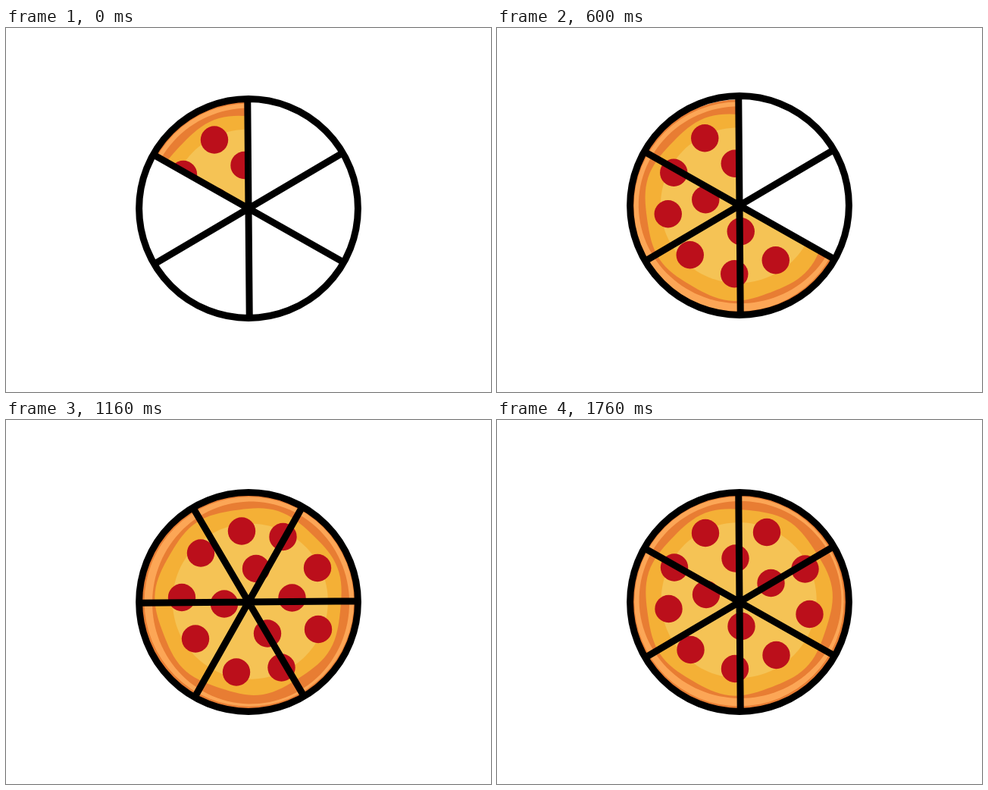
Write an HTML page with a canvas that moves like this. It is 640x480 px and loops after 1800 ms.

```html
<!DOCTYPE html>
<html lang="en">
<head>
<meta charset="utf-8">
<title>Pizza slices</title>
<style>
  html, body { margin: 0; width: 100%; height: 100%; overflow: hidden; background: #fff; }
  canvas { display: block; }
</style>
</head>
<body>
<canvas id="stage" width="640" height="480"></canvas>
<script>
const WIDTH = 640, HEIGHT = 480;
const LOOP = 1800, STEP = 200, BLEND = 40;
const TAU = Math.PI * 2, DEG = Math.PI / 180;
const wave = (deg, peak = 0, lobes = 1) => Math.cos(lobes * (deg - peak) * DEG);

// Outlines of the layers: radius by angle, clockwise from the top.
const crust = a => 131.7 + 3.2 * wave(a, 18) - 1.7 * wave(a, 0, 2);
const sauce = a => 122.8 + 1.5 * wave(a, 300) + 1.8 * wave(a, 288, 7);
const cheese = a => 102.5 + 2.5 * wave(a, 340);

const pepperoni = [
  [-45, -91], [36, -92], [86.5, -43.5], [92.5, 16], [48.5, 70], [-6, 88], [-64.5, 63],
  [-93.5, 9], [-86, -45.5], [-5.5, -57.5], [41.5, -25], [2.5, 32], [-44, -10]
];

function disc(ctx, x, y, r, color) {
  ctx.fillStyle = color;
  ctx.beginPath();
  ctx.arc(x, y, r, 0, TAU);
  ctx.fill();
}

function blob(ctx, radius, color) {
  ctx.fillStyle = color;
  ctx.beginPath();
  for (let a = 0; a < 360; a += 3) {
    ctx.lineTo(radius(a) * Math.sin(a * DEG), -radius(a) * Math.cos(a * DEG));
  }
  ctx.fill();
}

function drawPizza(ctx) {
  disc(ctx, 0, 0, 142, '#e87d33');
  disc(ctx, -0.5, -0.8, 138.2, '#fca656');
  blob(ctx, crust, '#e87d33');
  blob(ctx, sauce, '#f4b036');
  blob(ctx, cheese, '#f5c355');
  for (const [x, y] of pepperoni) disc(ctx, x, y, 18.2, '#bb0f1b');
}

function drawWheel(ctx) {
  ctx.lineWidth = 9;
  ctx.beginPath();
  ctx.arc(0, 0, 144.4, 0, TAU);
  for (let deg = 29.5; deg < 180; deg += 60) {
    const x = 143 * Math.cos(deg * DEG), y = 143 * Math.sin(deg * DEG);
    ctx.moveTo(-x, -y);
    ctx.lineTo(x, y);
  }
  ctx.stroke();
}

// Five scenes add a slice each, the rest turn the full pizza by quarters.
function paintScene(i) {
  const filling = i < 5;
  const slices = filling ? i + 1 : 6;
  const turn = filling ? 0 : (i - 5) * 90;
  const wheelY = !filling ? 0 : i < 2 ? i - 2 : -6;
  const [pizzaX, pizzaY] = filling ? [-0.25 * i, -1.5 - 0.75 * i] : [0, 0];

  const canvas = document.createElement('canvas');
  canvas.width = WIDTH;
  canvas.height = HEIGHT;
  const ctx = canvas.getContext('2d');
  ctx.fillStyle = '#fff';
  ctx.fillRect(0, 0, WIDTH, HEIGHT);
  ctx.translate(WIDTH / 2, HEIGHT / 2);
  ctx.rotate(turn * DEG);

  ctx.save();
  const top = -90.5 * DEG;
  ctx.beginPath();
  ctx.moveTo(0, wheelY);
  ctx.arc(0, wheelY, 146, top, top - slices * TAU / 6, true);
  ctx.clip();
  ctx.translate(pizzaX, pizzaY);
  drawPizza(ctx);
  ctx.restore();

  ctx.translate(0, wheelY);
  drawWheel(ctx);
  return canvas;
}

const scenes = Array.from({ length: 10 }, (_, i) => paintScene(i));
const stage = document.getElementById('stage').getContext('2d');

function show(i, alpha) {
  stage.globalAlpha = alpha;
  stage.drawImage(scenes[i], 0, 0);
}

function frame() {
  const t = performance.now() % LOOP + BLEND;
  const i = Math.floor(t / STEP);
  const mixing = i > 0 && i < 6 && t % STEP < BLEND;
  show(mixing ? i - 1 : i, 1);
  if (mixing) show(i, 0.5);
  requestAnimationFrame(frame);
}
frame();
</script>
</body>
</html>
```
